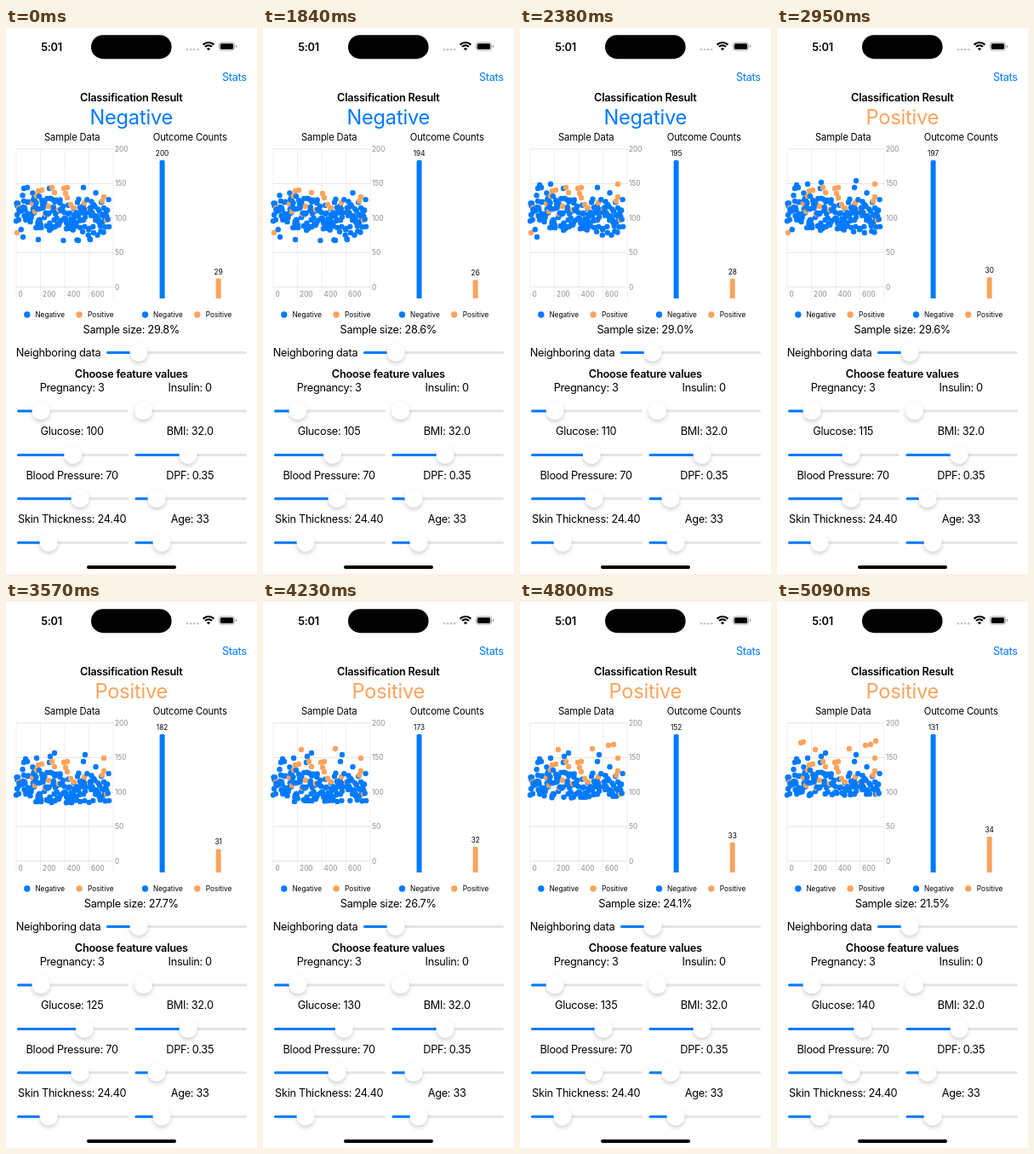
An HTML page that plays this animation: 295 by 640 pixels, repeating every 7160 ms.

```html
<!DOCTYPE html>
<html lang="en">
<head>
<meta charset="utf-8">
<style>
  html, body { margin: 0; width: 100%; height: 100%; overflow: hidden; background: #fff; }
  svg { display: block; width: 295px; height: 640px; font-family: Inter, Roboto, sans-serif; }
  text { dominant-baseline: alphabetic; }
  .body { font-size: 12.75px; letter-spacing: -.3px; }
  .bold { font-size: 12.75px; font-weight: 600; letter-spacing: -.25px; }
  .sub { font-size: 11.25px; letter-spacing: -.17px; }
  .tiny { font-size: 8.25px; }
  .big { font-size: 23.6px; letter-spacing: -.2px; }
</style>
</head>
<body>
<svg id="stage" viewBox="0 0 295 640">
  <defs>
    <filter id="shadow" x="-60%" y="-60%" width="220%" height="240%">
      <feDropShadow dx="0" dy="2.6" stdDeviation="2.6" flood-opacity=".2"/>
    </filter>
  </defs>
</svg>
<script>
const BLUE = '#007aff', ORANGE = '#fca45d', TRACK = '#e4e4e6', GRAY = '#8a8a8e';
const LOOP = 7160;
const MIDDLE = 147.3, LEFT = 77.7, RIGHT = 216.2;

// start time, glucose, positive result, outcome counts, visible band of the plot
const STEPS = [
  [0, 100, false, 200, 29, 186, 249.5],
  [1840, 105, false, 194, 26, 190, 249.5],
  [2380, 110, false, 195, 28, 183, 245],
  [2950, 115, true, 197, 30, 178, 242],
  [3270, 120, false, 190, 30, 176, 239],
  [3570, 125, true, 182, 31, 174, 236],
  [4230, 130, true, 173, 32, 171, 234],
  [4800, 135, true, 152, 33, 167, 230],
  [5090, 140, true, 131, 34, 162, 227]
];
const DATASET = 768;

const stage = document.getElementById('stage');

function add(tag, attrs) {
  const node = document.createElementNS('http://www.w3.org/2000/svg', tag);
  for (const key in attrs) node.setAttribute(key, attrs[key]);
  return stage.appendChild(node);
}
function label(str, x, y, cls, anchor = 'middle', fill = '#000') {
  const node = add('text', { x, y, class: cls, 'text-anchor': anchor, fill });
  node.textContent = str;
  return node;
}
const rect = (x, y, width, height, rx, fill) => add('rect', { x, y, width, height, rx, fill });
const dot = (cx, cy, r, fill) => add('circle', { cx, cy, r, fill });

function slider(left, right, y, thumbX) {
  rect(left, y - 1.5, right - left, 3, 1.5, TRACK);
  const fill = rect(left, y - 1.5, 0, 3, 1.5, BLUE);
  const thumb = dot(0, y - .4, 10.5, '#fff');
  thumb.setAttribute('filter', 'url(#shadow)');
  const move = x => {
    fill.setAttribute('width', x - left);
    thumb.setAttribute('cx', x);
  };
  move(thumbX);
  return move;
}

function statusBar() {
  label('5:01', 53.6, 26.5, 'bold');
  rect(100, 8.2, 94.6, 28, 14, '#000');
  for (let i = 0; i < 4; i++) dot(213 + i * 4.1, 25.2, 1.3, '#c4c4c6');
  for (const r of [9, 5.6]) {
    const d = r * Math.SQRT1_2;
    add('path', {
      d: `M${238 - d} ${26 - d}A${r} ${r} 0 0 1 ${238 + d} ${26 - d}`,
      fill: 'none', stroke: '#000', 'stroke-width': 2.2
    });
  }
  add('path', { d: 'M238 26.6l-2.1-2.4a3 3 0 0 1 4.2 0z' });
  add('rect', { x: 250.5, y: 17, width: 18, height: 9.2, rx: 2.8, fill: 'none', stroke: '#9b9b9d', 'stroke-width': .9 });
  rect(251.8, 18.3, 15.4, 6.6, 1.6, '#000');
  rect(270, 20.1, 1.2, 3, .6, '#9b9b9d');
  rect(95, 630, 105, 4, 2, '#000');
}

function plotGrid() {
  const line = d => add('path', { d, stroke: '#dadade', 'stroke-width': .8, 'stroke-dasharray': '1.5 1.5' });
  for (let i = 0; i < 5; i++) {
    const y = 142 + i * 40.4, x = 12 + i * 28.5;
    add('path', { d: `M12 ${y}H126`, stroke: '#e0e0e3', 'stroke-width': .8 });
    line(`M${x} 142V317`);
    label(200 - i * 50, 128, y + 3, 'tiny', 'start', GRAY);
    if (i < 4) label(i * 200, x + 2.6, 314.5, 'tiny', 'start', GRAY);
  }
}

function samplePoints() {
  let seed = 29;
  const random = () => (seed = (seed * 16807) % 2147483647) / 2147483647;
  const tag = color => ([x, y]) => ({ x, y, color });
  const positives = [
    [54, 187], [57, 193], [38, 191], [36, 197], [68, 188], [72, 187], [70, 194], [72, 199],
    [34, 215], [13, 240], [115, 198], [113, 203], [92, 205], [118, 225], [15, 211], [50, 209],
    [62, 213], [80, 211], [98, 212], [31, 206], [46, 218], [76, 207], [42, 190], [115, 183],
    [45, 173], [85, 172], [28, 165], [31, 164], [104, 168], [110, 167], [116, 163]
  ].map(tag(ORANGE));
  const negatives = [
    [21, 188], [25, 187], [51, 188], [91, 187], [85, 249], [99, 248], [20, 245], [38, 248],
    [23, 184], [36, 183], [52, 181], [57, 177], [93, 179]
  ];
  for (let i = 0; i < 190; i++) {
    const spread = random() + random() + random() - 1.5;
    negatives.push([12 + 109.5 * (i * .618034 % 1), 221 + spread * 23]);
  }
  return negatives.map(tag(BLUE)).concat(positives).sort((a, b) => a.x - b.x);
}

function legend(x) {
  [['Negative', BLUE], ['Positive', ORANGE]].forEach(([name, color], i) => {
    dot(x + i * 61.3, 336, 3.7, color);
    label(name, x + 9.6 + i * 61.7, 339, 'tiny', 'start');
  });
}

function outcomeBar(x, color) {
  const bar = add('path', { fill: color });
  const count = label('', x + 3, 0, 'tiny');
  return (n, max) => {
    const top = 317 - 162 * n / max;
    bar.setAttribute('d', `M${x} 317V${top + 1.5}q0-1.5 1.5-1.5h3q1.5 0 1.5 1.5V317z`);
    count.setAttribute('y', top - 5);
    count.textContent = n;
  };
}

statusBar();
label('Stats', 282.8, 61.5, 'body', 'end', BLUE);
label('Classification Result', MIDDLE, 85.5, 'bold');
const result = label('', MIDDLE, 112.6, 'big');
label('Sample Data', LEFT, 131.7, 'sub');
label('Outcome Counts', RIGHT, 131.7, 'sub');

plotGrid();
const points = samplePoints();
for (const p of points) p.node = dot(p.x, p.y, 3.2, p.color);
legend(24.8);
legend(163.5);
const negativeBar = outcomeBar(180.6, BLUE);
const positiveBar = outcomeBar(246.7, ORANGE);

const sampleSize = label('', MIDDLE, 358, 'body');
label('Neighboring data', 11.8, 385, 'body', 'start');
slider(118, 283, 380.5, 156);
label('Choose feature values', MIDDLE, 409.5, 'bold');

const features = [
  ['Pregnancy: 3', 41, 'Insulin: 0', 161.5],
  ['', 78.5, 'BMI: 32.0', 214],
  ['Blood Pressure: 70', 87, 'DPF: 0.35', 177],
  ['Skin Thickness: 24.40', 50, 'Age: 33', 183]
].map(([left, leftX, right, rightX], i) => {
  const y = 426 + i * 51.4, trackY = 449 + i * 51.4;
  const text = label(left, LEFT, y, 'body');
  label(right, RIGHT, y, 'body');
  const move = slider(13, 144, trackY, leftX);
  slider(151.5, 283, trackY, rightX);
  return { text, move };
});
const glucoseRow = features[1];

let shown = null;
function draw(time) {
  const step = STEPS.filter(s => s[0] <= time).pop();
  if (step === shown) return;
  shown = step;
  const [, glucose, positive, negCount, posCount, top, bottom] = step;
  result.textContent = positive ? 'Positive' : 'Negative';
  result.setAttribute('fill', positive ? ORANGE : BLUE);
  negativeBar(negCount, negCount);
  positiveBar(posCount, negCount);
  sampleSize.textContent = `Sample size: ${((negCount + posCount) / DATASET * 100).toFixed(1)}%`;
  glucoseRow.text.textContent = `Glucose: ${glucose}`;
  glucoseRow.move(23.7 + glucose * .55);
  for (const p of points) {
    p.node.setAttribute('visibility', p.y >= top && p.y <= bottom ? 'visible' : 'hidden');
  }
}

const start = performance.now();
function tick() {
  draw((performance.now() - start) % LOOP);
  requestAnimationFrame(tick);
}
tick();
</script>
</body>
</html>
```
